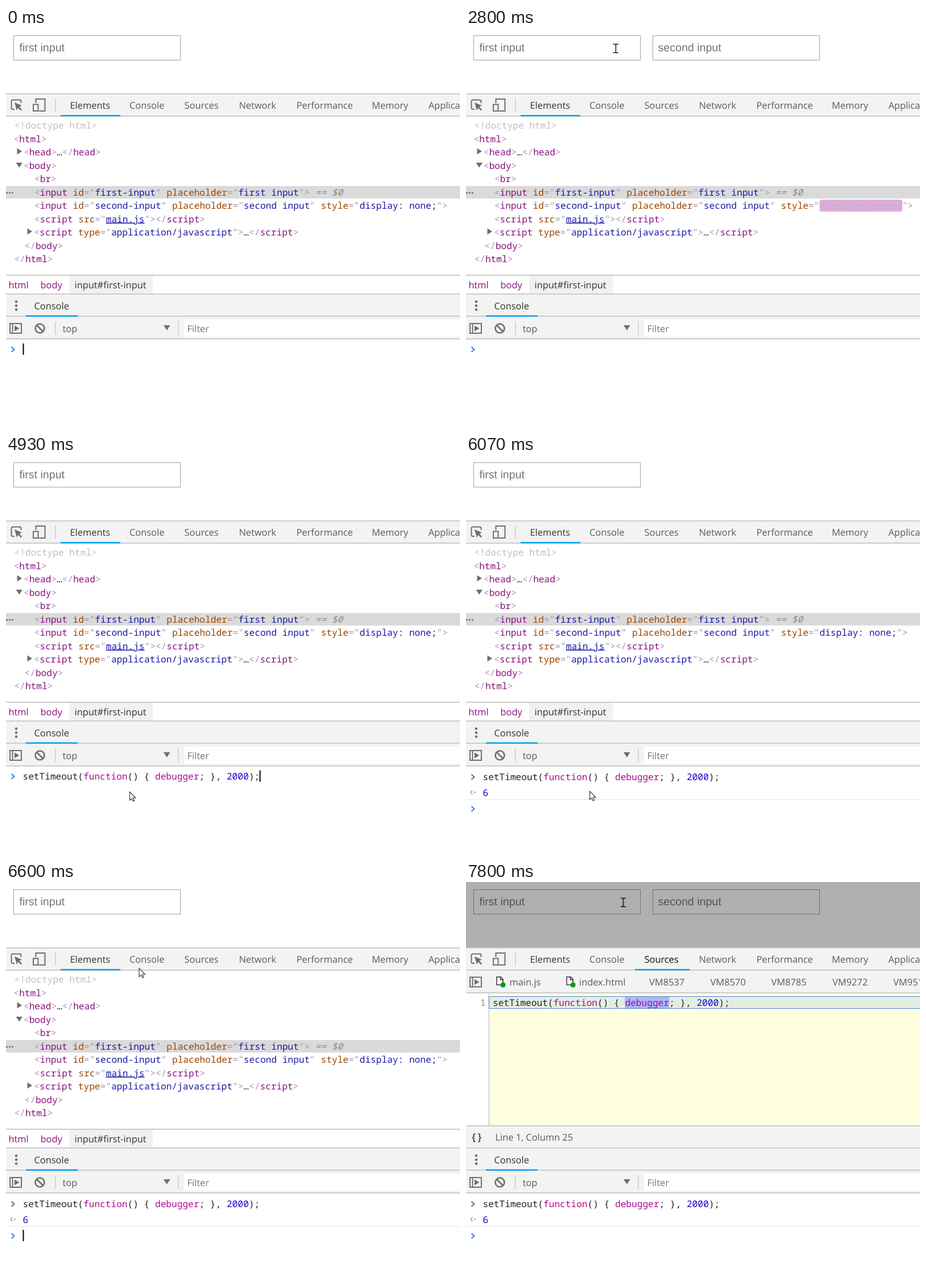
Recreate the animation shown at these times as an HTML page. Size 798x702 px, loop 8000 ms.

```html
<!DOCTYPE html>
<html lang="en">
<head>
<meta charset="utf-8">
<title>Inspecting a hover-only input</title>
<style>
html, body { margin: 0; width: 100%; height: 100%; overflow: hidden; background: #fff; }
svg { display: block; width: 798px; height: 702px; }

text { font: 16.4px "Open Sans", sans-serif; fill: #5a5a5a; text-rendering: geometricPrecision; }
.mono text, text.mono { font: 16.15px "Noto Sans Mono", monospace; }
.field text { font: 19.6px "Liberation Sans", sans-serif; fill: #757575; }
.field rect { fill: #fff; stroke: #a2a2a2; }
.dark { fill: #333; }
.bar { fill: #f3f3f3; }
.line { fill: #ccc; }
.blue { fill: #03a3ee; }
.icon { fill: none; stroke: #6e6e6e; stroke-width: 2; }
.solid { fill: #6e6e6e; }

/* markup colours */
.dom text { fill: #a894a6; }
.dom .t, .crumb { fill: #881280; }
.dom .a { fill: #994500; }
.dom .v { fill: #1a1aa6; }
.dom .link { text-decoration: underline 1px; }
.dom .doctype { fill: #c0c0c0; }
.dom .ref { fill: #8a8a8a; font-style: italic; }

/* script colours */
.code text { fill: #222; }
.code .k { fill: #aa0d91; }
.code .n { fill: #1c00cf; }

/* hard switches: every loop is 8 s, 1% = 80 ms */
.step { animation: 8s step-end infinite; animation-name: var(--k); }
@keyframes hovered {
  0%, 22.875%, 39.25% { opacity: 0 }
  15.875%, 30%, 86%, 100% { opacity: 1 }
}
@keyframes unhovered {
  0%, 22.875%, 39.25% { opacity: 1 }
  15.875%, 30%, 86%, 100% { opacity: 0 }
}
@keyframes show1 { 0%, 22.875%, 100% { opacity: 0 } 15.875% { opacity: 1 } }
@keyframes hide1 { 0%, 30%, 100% { opacity: 0 } 22.875% { opacity: 1 } }
@keyframes show2 { 0%, 39.25%, 100% { opacity: 0 } 30% { opacity: 1 } }
@keyframes hide2 { 0%, 39.25% { opacity: 1 } 15.875%, 86%, 100% { opacity: 0 } }
@keyframes show3 { 0% { opacity: 0 } 86%, 100% { opacity: 1 } }

@keyframes caret {
  0%, 10.875%, 24.125%, 37.5%, 50.875% { opacity: 1; transform: none }
  4.125%, 17.5%, 30.875%, 44.125%, 57.5% { opacity: 0; transform: none }
  61.625% { opacity: 1; transform: translateX(416px) }
  68.375% { opacity: 0; transform: translateX(416px) }
  69.125%, 82.5% { opacity: 1; transform: translateY(57px) }
  75%, 89.125%, 100% { opacity: 0; transform: translateY(57px) }
}
@keyframes typed {
  0% { opacity: 0; transform: none }
  61.625% { opacity: 1; transform: none }
  69.125%, 100% { opacity: 1; transform: translateY(1px) }
}
@keyframes prompt { 0% { transform: none } 69.125%, 100% { transform: translateY(57px) } }
@keyframes logged { 0% { opacity: 0 } 69.125%, 100% { opacity: 1 } }
@keyframes dimmed { 0% { opacity: 0 } 95%, 100% { opacity: 1 } }
@keyframes sources { 0% { opacity: 0 } 95.875%, 100% { opacity: 1 } }
@keyframes loaded { 0% { opacity: 0 } 96.625%, 100% { opacity: 1 } }
@keyframes unloaded { 0% { opacity: 1 } 96.625%, 100% { opacity: 0 } }
@keyframes marked { 0% { opacity: 0 } 97.5%, 100% { opacity: 1 } }
@keyframes appear { 0% { opacity: 0 } 13.375%, 100% { opacity: 1 } }

/* attribute change: a purple flash that fades over 1.4 s */
.flash rect { animation: glow 8s cubic-bezier(0, 0, .2, 1) calc(var(--at) - 8s) infinite; }
.flash .v { animation: ink 8s cubic-bezier(0, 0, .2, 1) calc(var(--at) - 8s) infinite; }
@keyframes glow {
  0% { fill: rgb(158, 54, 153) }
  14% { fill: rgb(245, 219, 244) }
  17.5%, 100% { fill: rgba(255, 255, 255, 0) }
}
@keyframes ink {
  0% { fill: #fff }
  14% { fill: #a894a6 }
  17.5%, 100% { fill: #1a1aa6 }
}

/* row under the pointer on its way up */
.hover { animation: rows 8s infinite; }
@keyframes rows {
  0% { opacity: 0; transform: translateY(235px); animation-timing-function: step-end }
  78.125% { opacity: 1; transform: translateY(235px); animation-timing-function: steps(11, end) }
  82.375% { opacity: 1; transform: translateY(-23.5px); animation-timing-function: step-end }
  82.376%, 100% { opacity: 0; transform: translateY(-23.5px) }
}

.mouse { animation: move 8s linear infinite; }
@keyframes move {
  0%, 13.375% { transform: translate(345px, 6px) }
  15.875% { transform: translate(306px, 30px) }
  18% { transform: translate(256px, 35px) }
  20.5% { transform: translate(258px, 35px) }
  22.875% { transform: translate(312px, 32px) }
  23.375% { transform: translate(352px, 30px) }
  26% { transform: translate(366px, 31px) }
  30% { transform: translate(306px, 34px) }
  32.5% { transform: translate(262px, 36px) }
  36.5% { transform: translate(264px, 36px) }
  39.25% { transform: translate(309px, 34px) }
  42.5%, 45% { transform: translate(346px, 33px) }
  46.625% { transform: translate(340px, 90px) }
  49% { transform: translate(258px, 430px) }
  53%, 75.875% { transform: translate(217px, 592px) }
  79.125% { transform: translate(205px, 338px) }
  82.375% { transform: translate(232px, 155px) }
  86% { transform: translate(270px, 56px) }
  89%, 100% { transform: translate(276.5px, 36px) }
}
</style>
</head>
<body>
<svg viewBox="0 0 798 702" xml:space="preserve">
  <defs>
    <g id="run"><path class="icon" stroke-width="1.6" d="M7 520H27V537H7ZM11.5 520V537"/><path class="solid" d="M15 523.5L23.5 528.5L15 533.5Z"/></g>
    <g id="doc"><path d="M54 167H61L65 171V181H54Z" fill="#fff" stroke="#333" stroke-width="1.5"/><path d="M60.5 167V172H65" fill="none" stroke="#333" stroke-width="1.5"/><circle cx="65" cy="181" r="4.6" fill="#0a9b10"/></g>
    <path id="chevron" d="M9.5 561L14.5 565.5L9.5 570" fill="none" stroke-width="2"/>
  </defs>

  <!-- page -->
  <g class="field"><rect x="13.5" y="13.5" width="293" height="43"/><text x="23.5" y="41">first input</text></g>
  <g class="field step" style="--k:hovered"><rect x="328.5" y="13.5" width="293" height="43"/><text x="337.5" y="41">second input</text></g>

  <!-- main toolbar -->
  <rect class="bar" y="115" width="798" height="40"/>
  <rect class="line" y="115" width="798" height="2"/>
  <rect class="line" y="154" width="798" height="2"/>
  <path class="icon" d="M15 143H12Q9.5 143 9.5 140.5V129Q9.5 126.5 12 126.5H24Q26.5 126.5 26.5 129V132"/>
  <path class="solid" d="M15 131L28 136.5L23.5 138.5L28 143.5L26 145.5L21.5 140.5L19 145Z"/>
  <path class="icon" d="M52.5 132V125H68.5V146H58M48 134.5H56.5V146H48Z"/>
  <rect class="line" x="86" y="124" width="1.5" height="23"/>
  <text class="dark" x="112.5" y="142">Elements</text>
  <text x="217" y="142">Console</text>
  <text x="313.5" y="142">Sources</text>
  <text x="409.5" y="142">Network</text>
  <text x="510.5" y="142">Performance</text>
  <text x="643" y="142">Memory</text>
  <text x="742.5" y="142">Application</text>
  <rect class="blue step" style="--k:unloaded" x="96" y="153" width="105" height="2.5"/>

  <!-- element tree -->
  <rect class="hover" y="160" width="798" height="22" fill="#ebeffb"/>
  <rect y="278" width="798" height="22" fill="#dadada"/>
  <g class="solid"><circle cx="1.5" cy="290" r="1.6"/><circle cx="6.5" cy="290" r="1.6"/><circle cx="11.5" cy="290" r="1.6"/><path d="M19.5 211.5L28 217L19.5 222.5ZM17.5 237H29L23.25 245.5ZM37.5 352.5L46 358L37.5 363.5Z"/></g>
  <g class="dom mono">
    <text x="14.5" y="177"><tspan class="doctype">&lt;!doctype html&gt;</tspan></text>
    <text x="13.5" y="200.5">&lt;<tspan class="t">html</tspan>&gt;</text>
    <text x="31" y="224">&lt;<tspan class="t">head</tspan>&gt;<tspan class="dark">…</tspan>&lt;/<tspan class="t">head</tspan>&gt;</text>
    <text x="31" y="247.5">&lt;<tspan class="t">body</tspan>&gt;</text>
    <text x="50" y="271">&lt;<tspan class="t">br</tspan>&gt;</text>
    <text x="49.8" y="294.5">&lt;<tspan class="t">input</tspan> <tspan class="a">id</tspan>="<tspan class="v">first-input</tspan>" <tspan class="a">placeholder</tspan>="<tspan class="v">first input</tspan>"&gt;<tspan class="ref"> == $0</tspan></text>
    <text x="49.8" y="318">&lt;<tspan class="t">input</tspan> <tspan class="a">id</tspan>="<tspan class="v">second-input</tspan>" <tspan class="a">placeholder</tspan>="<tspan class="v">second input</tspan>" <tspan class="a">style</tspan>="</text>
    <g class="flash step" style="--k:show1;--at:1.27s"><rect x="621.5" y="302" width="145.4" height="21" rx="3"/><text x="621.5" y="318"><tspan class="v">display: unset;</tspan>"&gt;</text></g>
    <g class="flash step" style="--k:hide1;--at:1.83s"><rect x="621.5" y="302" width="135.7" height="21" rx="3"/><text x="621.5" y="318"><tspan class="v">display: none;</tspan>"&gt;</text></g>
    <g class="flash step" style="--k:show2;--at:2.4s"><rect x="621.5" y="302" width="145.4" height="21" rx="3"/><text x="621.5" y="318"><tspan class="v">display: unset;</tspan>"&gt;</text></g>
    <g class="flash step" style="--k:hide2;--at:3.14s"><rect x="621.5" y="302" width="135.7" height="21" rx="3"/><text x="621.5" y="318"><tspan class="v">display: none;</tspan>"&gt;</text></g>
    <g class="flash step" style="--k:show3;--at:6.88s"><rect x="621.5" y="302" width="145.4" height="21" rx="3"/><text x="621.5" y="318"><tspan class="v">display: unset;</tspan>"&gt;</text></g>
    <text x="49.8" y="341.5">&lt;<tspan class="t">script</tspan> <tspan class="a">src</tspan>="<tspan class="v link">main.js</tspan>"&gt;&lt;/<tspan class="t">script</tspan>&gt;</text>
    <text x="49.3" y="365">&lt;<tspan class="t">script</tspan> <tspan class="a">type</tspan>="<tspan class="v">application/javascript</tspan>"&gt;<tspan class="dark">…</tspan>&lt;/<tspan class="t">script</tspan>&gt;</text>
    <text x="32.5" y="388.5">&lt;/<tspan class="t">body</tspan>&gt;</text>
    <text x="14.5" y="412">&lt;/<tspan class="t">html</tspan>&gt;</text>
  </g>

  <!-- breadcrumbs -->
  <rect class="line" y="434" width="798" height="2"/>
  <rect x="111" y="436" width="147" height="31" fill="#f1f1f1"/>
  <text class="crumb" x="4.5" y="458">html</text>
  <text class="crumb" x="60.5" y="458">body</text>
  <text class="dark" x="120.5" y="458">input#first-input</text>

  <!-- sources panel -->
  <g class="step" style="--k:sources">
    <rect y="156" width="798" height="312" fill="#fff"/>
    <rect class="bar" y="156" width="798" height="38"/>
    <rect class="line" y="194" width="798" height="2"/>
    <use href="#run" y="-352.5"/>
    <rect class="line" x="39.5" y="196" width="1.5" height="232"/>
    <rect class="bar" y="430" width="798" height="38"/>
    <rect class="line" y="428" width="798" height="2"/>
    <text class="mono" x="8" y="454.5" style="font-weight:700;font-size:18px">{}</text>
  </g>
  <g class="step" style="--k:loaded">
    <rect class="blue" x="297" y="153" width="96" height="2.5"/>
    <text class="dark" x="313.5" y="142">Sources</text>
    <use href="#doc"/><text x="76.5" y="182">main.js</text>
    <use href="#doc" x="123"/><text x="199" y="182">index.html</text>
    <text x="322" y="182">VM8537</text>
    <text x="429.5" y="182">VM8570</text>
    <text x="536.5" y="182">VM8785</text>
    <text x="644" y="182">VM9272</text>
    <text x="751" y="182">VM9510</text>
    <rect x="41" y="196" width="757" height="232" fill="#ffffde"/>
    <rect x="40.5" y="201.5" width="760" height="21" fill="#e5ede1" stroke="#4d84e6"/>
    <rect class="step" style="--k:marked" x="279.3" y="202" width="78" height="20" fill="#a9b8fb"/>
    <text class="mono" x="25" y="217.5" style="fill:#8a8a8a">1</text>
    <g class="code mono"><text x="47" y="217.5">setTimeout(<tspan class="k">function</tspan>() { <tspan class="k">debugger</tspan>; }, <tspan class="n">2000</tspan>);</text></g>
    <text x="51.5" y="455">Line 1, Column 25</text>
  </g>

  <!-- console drawer -->
  <rect class="bar" y="468" width="798" height="79"/>
  <rect class="line" y="467" width="798" height="2"/>
  <rect class="line" y="506" width="798" height="2"/>
  <rect class="line" y="546" width="798" height="2"/>
  <g class="solid"><circle cx="18" cy="481.5" r="2.3"/><circle cx="18" cy="488.5" r="2.3"/><circle cx="18" cy="495.5" r="2.3"/><path d="M277 523H288.5L282.75 532Z"/></g>
  <text class="dark" x="49.5" y="494.5">Console</text>
  <rect class="blue" x="35" y="505.5" width="91" height="2.5"/>
  <use href="#run"/>
  <path class="icon" style="stroke-width:2.6" d="M51.5 528.5a8 8 0 1 0 16 0a8 8 0 1 0 -16 0M54 523L65 534"/>
  <rect class="line" x="86" y="516" width="1.5" height="24"/>
  <text x="99.5" y="534.5">top</text>
  <rect class="line" x="302" y="516" width="1.5" height="24"/>
  <rect x="313" y="513" width="485" height="30" fill="#fff"/>
  <text x="318.5" y="534.5" style="fill:#757575">Filter</text>

  <!-- console log and prompt -->
  <g class="step" style="--k:logged">
    <use href="#chevron" y="1" stroke="#6e6e6e"/>
    <path d="M11.5 590L8 593.5L11.5 597" fill="none" stroke="#b0b0b0" stroke-width="1.8"/>
    <circle cx="15.5" cy="593.5" r="1.6" fill="#b0b0b0"/>
    <g class="code mono"><text x="29.5" y="599.5"><tspan class="n">6</tspan></text></g>
    <rect y="605.5" width="798" height="1" fill="#e4e4e4"/>
  </g>
  <g class="code mono step" style="--k:typed"><text x="29.5" y="571">setTimeout(<tspan class="k">function</tspan>() { <tspan class="k">debugger</tspan>; }, <tspan class="n">2000</tspan>);</text></g>
  <g class="step" style="--k:prompt"><use href="#chevron" stroke="#367cf1"/></g>
  <rect class="step" style="--k:caret" x="29.5" y="555" width="2" height="20"/>

  <!-- pointer -->
  <g class="step" style="--k:appear"><g class="mouse">
    <path class="step" style="--k:unhovered" d="M.5 .5V15.5L4 12.3L6.3 17.3L8.6 16.3L6.4 11.3H11Z" fill="#fff" stroke="#2a2a36" stroke-width="1.1"/>
    <path class="step" style="--k:hovered" d="M-4.5 -7.5H-1Q0 -7.5 0 -6.5Q0 -7.5 1 -7.5H4.5M0 -7V7M-4.5 7.5H-1Q0 7.5 0 6.5Q0 7.5 1 7.5H4.5" fill="none" stroke="#111" stroke-width="1.5"/>
  </g></g>

  <!-- page dimmed by the debugger -->
  <rect class="step" style="--k:dimmed" width="798" height="115" fill="#000" fill-opacity=".31"/>
</svg>
</body>
</html>
```
